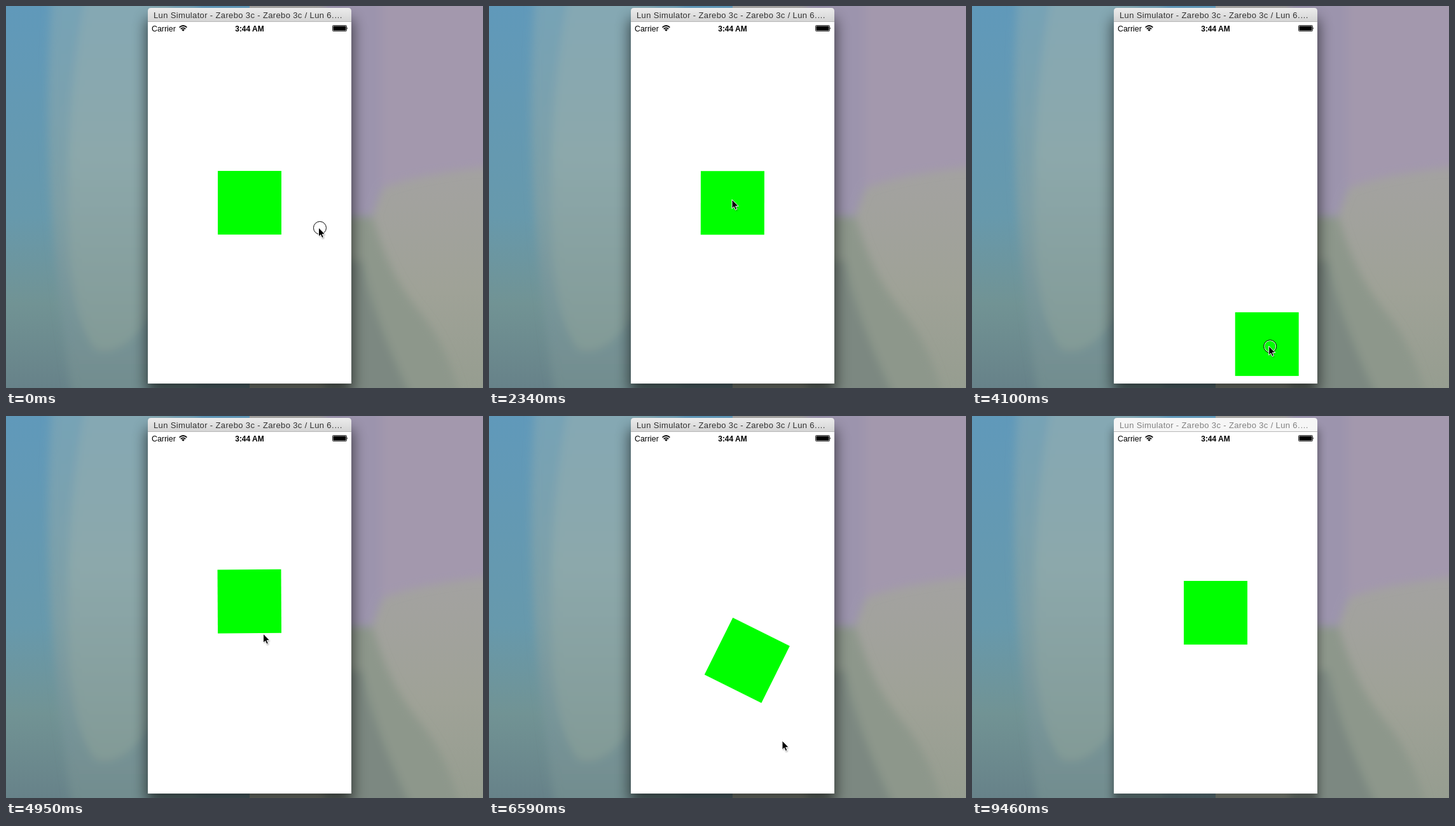
Recreate the animation shown at these times as an HTML page. Size 750 by 600 pixels, loop 9480 ms.

```html
<!DOCTYPE html>
<html lang="en">
<head>
<meta charset="utf-8">
<title>Snap back</title>
<style>
  html, body { margin: 0; width: 100%; height: 100%; overflow: hidden; }
  svg { display: block; width: 750px; height: 600px; }
  text { font: 12px "Liberation Sans", Arial, sans-serif; }
  #title { font-size: 13px; letter-spacing: .36px; fill: #303030; }
  #shade { opacity: .6; }
  .idle #title { fill: #808080; }
  .idle #bar { fill: #f6f6f6; }
  .idle #shade { opacity: .4; filter: url(#blur8); }
</style>
</head>
<body>
<svg id="stage" viewBox="0 0 750 600">
  <defs>
    <filter id="blur8" x="-20%" y="-20%" width="140%" height="140%"><feGaussianBlur stdDeviation="7"/></filter>
    <filter id="blur12" x="-20%" y="-20%" width="140%" height="140%"><feGaussianBlur stdDeviation="11"/></filter>
    <filter id="soft" x="-50%" y="-50%" width="200%" height="200%"><feGaussianBlur stdDeviation="1"/></filter>
    <linearGradient id="blue" x2="0" y2="1">
      <stop stop-color="#6099ba"/><stop offset=".55" stop-color="#6799ac"/>
      <stop offset=".78" stop-color="#719394"/><stop offset="1" stop-color="#678289"/>
    </linearGradient>
    <linearGradient id="mid" x2="0" y2="1">
      <stop stop-color="#76a3b7"/><stop offset=".5" stop-color="#7e9fa6"/>
      <stop offset="1" stop-color="#708a8b"/>
    </linearGradient>
    <linearGradient id="pale" x2="0" y2="1">
      <stop stop-color="#84a8b4"/><stop offset=".45" stop-color="#8ca8ab"/>
      <stop offset="1" stop-color="#829a96"/>
    </linearGradient>
    <linearGradient id="sand" x2="0" y2="1">
      <stop offset=".45" stop-color="#a3a2a0"/><stop offset=".75" stop-color="#9fa297"/>
      <stop offset="1" stop-color="#969d90"/>
    </linearGradient>
    <linearGradient id="chrome" x2="0" y2="1">
      <stop stop-color="#ececec"/><stop offset="1" stop-color="#d4d4d4"/>
    </linearGradient>
  </defs>

  <rect width="383" height="600" fill="url(#blue)"/>
  <rect x="383" width="367" height="600" fill="url(#sand)"/>
  <g filter="url(#blur8)">
    <path d="M72-20Q58 200 78 400T110 640H300V-20Z" fill="url(#mid)"/>
    <path d="M125-20Q95 150 98 300Q95 480 140 540Q200 560 260 420V-20Z" fill="url(#pale)"/>
    <path d="M500-30H790V250Q650 262 592 286L576 325Q540 200 500-30Z" fill="#a398ad"/>
    <path d="M500-30H590V290L576 330H500Z" fill="#9c94ad"/>
    <path d="M500 330H576Q600 420 650 480T720 640H500Z" fill="#8d978b"/>
    <path d="M500 400H560Q580 500 650 640H500Z" fill="#7c8881"/>
  </g>

  <rect id="shade" x="221" y="20" width="324" height="588" rx="5" filter="url(#blur12)"/>
  <rect x="223" y="15" width="320" height="578" fill="#fff"/>
  <path id="bar" d="M223 25V8Q223 3 228 3H538Q543 3 543 8V25Z" fill="url(#chrome)"/>
  <path d="M223 24.5H543" stroke="#b8b8b8"/>
  <text id="title" x="232" y="19">Lun Simulator - Zarebo 3c - Zarebo 3c / Lun 6.…</text>

  <text x="229" y="39.5" style="font-size:12.4px">Carrier</text>
  <g fill="none" stroke="#000" stroke-width="1.7">
    <path d="M272.6 33.6Q278.5 28.4 284.4 33.6M274.8 36Q278.5 32.7 282.2 36"/>
    <path d="M276.2 37.3Q278.5 35.4 280.8 37.3L278.5 39.8Z" fill="#000" stroke="none"/>
  </g>
  <text x="383" y="39.5" text-anchor="middle" font-weight="700" style="font-weight:700">3:44 AM</text>
  <rect x="513.5" y="30.5" width="22" height="9" rx="1" fill="none" stroke="#000" stroke-width=".8"/>
  <path d="M514.5 31.5H534.5V38.5H514.5ZM536.3 33.3Q538 35 536.3 36.7Z"/>

  <rect id="box" x="-50" y="-50" width="100" height="100" fill="#0f0"/>
  <g id="pointer">
    <g id="touch" fill="none">
      <circle cx="2" cy=".5" r="9" stroke="#fff"/>
      <circle cx="2" cy=".5" r="10" stroke="#000"/>
    </g>
    <path d="M1 2V15L4 13 6 18 9 17 7 12H11Z" opacity=".35" filter="url(#soft)"/>
    <path d="M0 0V14.3L3.2 11.3 5.4 16.3 7.9 15.2 5.7 10.4H10.2Z" stroke="#fff"/>
  </g>
</svg>

<script>
const LOOP = 9480, HOME = [383, 309];
const get = id => document.getElementById(id);
const stage = get("stage"), box = get("box"), pointer = get("pointer"), touch = get("touch");

// time, x, y of the pointer tip
const track = [
  [0, 491.5, 348], [260, 491.5, 348], [560, 384, 310], [660, 384, 310],
  [1180, 338, 453], [1380, 316, 493], [1480, 322, 487], [1640, 322, 487],
  [2120, 382, 304], [2380, 382, 304], [2680, 454, 489], [2900, 454, 489],
  [3310, 423.5, 428], [3540, 386, 312], [3610, 386, 312],
  [4000, 475, 527], [4180, 461, 539], [4350, 461, 539],
  [4780, 404.5, 342], [5900, 404.5, 342], [6080, 409, 340], [6140, 409, 340],
  [6480, 461, 510], [6650, 461, 510], [7000, 416, 398], [7260, 380, 311],
  [7460, 380, 311], [7850, 293, 486], [8250, 279, 534], [8480, 279, 534],
  [9040, 609, 390]
];
// vertical hop after the tap
const hop = [[4905, 0], [5180, -231], [5230, -231], [5640, 9], [5950, 0]];
// press, release, spin in degrees
const drags = [
  [640, 1480, -50], [2370, 2680, 40], [3600, 4180, 40], [6130, 6504, 78], [7450, 8440, 0]
];
const taps = [[0, 60], [4790, 4890]];

// eased value of a keyed track
function at(keys, t) {
  const n = keys.findIndex(k => k[0] > t);
  if (n < 0) return keys[keys.length - 1].slice(1);
  if (n === 0) return keys[0].slice(1);
  const a = keys[n - 1], b = keys[n], u = (t - a[0]) / (b[0] - a[0]);
  const e = u * u * (3 - 2 * u);
  return a.slice(1).map((v, i) => v + (b[i + 1] - v) * e);
}

function pose(t) {
  const drag = drags.filter(d => t >= d[0]).pop();
  if (!drag) return [0, 0, 0];
  const [press, release, spin] = drag;
  const from = at(track, press), to = at(track, Math.min(t, release));
  let [x, y] = [to[0] - from[0], to[1] - from[1]], angle = 0;
  if (t > release) {
    const s = (t - release) / 1000;
    const k = s > .9 ? 0 : Math.exp(-7.1 * s) * (Math.cos(14 * s) + .5 * Math.sin(14 * s));
    x *= k;
    y *= k;
    angle = s > .9 ? 0 : spin * Math.exp(-6 * s) * Math.sin(7 * s);
  }
  return [x, y + at(hop, t)[0] * (t < 6000 ? 1 : 0), angle];
}

function draw(now) {
  const t = now % LOOP;
  const [x, y, angle] = pose(t);
  const [px, py] = at(track, t);
  const down = [...drags, ...taps].some(([a, b]) => t >= a && t < b);
  box.setAttribute("transform", `translate(${HOME[0] + x} ${HOME[1] + y}) rotate(${angle})`);
  pointer.setAttribute("transform", `translate(${px} ${py})`);
  pointer.style.display = t < 9040 ? "" : "none";
  touch.style.display = down ? "" : "none";
  stage.classList.toggle("idle", t >= 9460);
}

const start = performance.now();
function tick() {
  draw(performance.now() - start);
  requestAnimationFrame(tick);
}
tick();
</script>
</body>
</html>
```
